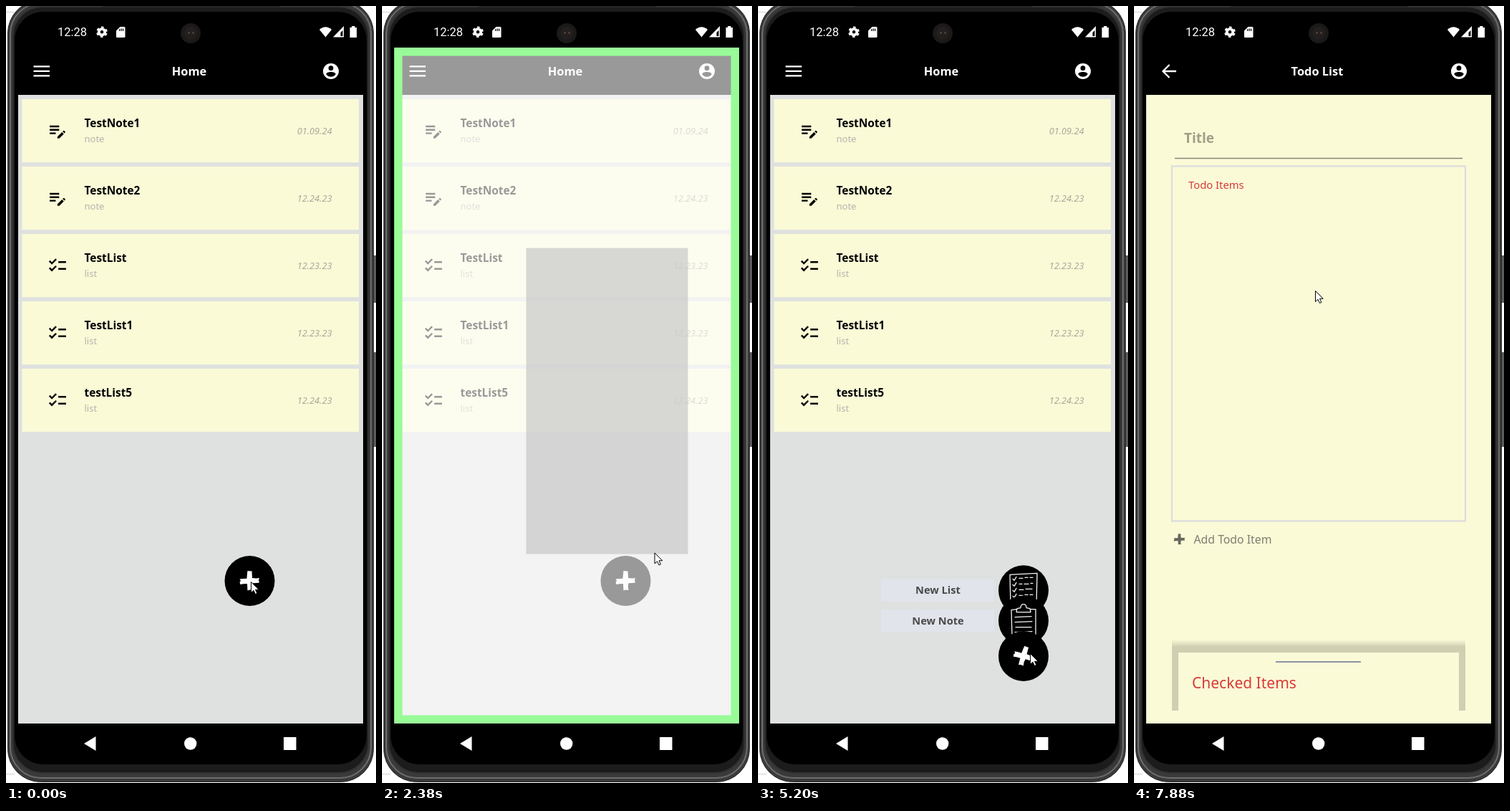
An HTML page that plays this animation: 517x1084 px, repeating every 8000 ms.

```html
<!DOCTYPE html>
<html lang="en">
<head>
<meta charset="utf-8">
<title>Notes app</title>
<style>
html, body { margin: 0; width: 100%; height: 100%; overflow: hidden; background: #fff; }
svg { display: block; width: 517px; height: 1084px; }
text { font-family: "Noto Sans", "Open Sans", sans-serif; }
.name { font-size: 15.4px; font-weight: 600; }
.kind { font-size: 13px; fill: #b4b4ae; }
.date { font-size: 12.8px; font-style: italic; fill: #a9a99c; text-anchor: end; }
.head { font-size: 16.4px; font-weight: 600; fill: #fff; text-anchor: middle; }
.label { font-size: 14.6px; font-weight: 600; fill: #4a4a4a; text-anchor: middle; }
.red { fill: #d93a38; }
.sketch { fill: none; stroke: #f4f4f4; stroke-width: 1.3; stroke-linecap: round; stroke-linejoin: round; }
</style>
</head>
<body>
<svg viewBox="0 0 517 1084">
  <defs>
    <path id="note" d="M3 10h11v2H3zm0-2h11V6H3zm0 8h7v-2H3zm15-3.1.7-.7c.4-.4 1-.4 1.4 0l.7.7c.4.4.4 1 0 1.4l-.7.7zm-.7.7L12 18.9V21h2.1l5.3-5.3z"/>
    <path id="list" d="M22 7h-9v2h9zm0 8h-9v2h9zM5.5 11 2 7.5 3.4 6l2.1 2.2 4.3-4.3 1.4 1.4zm0 8L2 15.5 3.4 14l2.1 2.2 4.3-4.3 1.4 1.4z"/>
    <path id="plus" d="M-3-14 2-13.5 3-14 3.5-4 9-3.6 13.5-4 12.5-1 13.5 2.5 9 3 4 3.2 3.2 8 4 13 0 12.6-3 13.5-3.5 4-9 4.2-13 5-14 2-12.5 0-14-2.5-9-3-4-3.3-3.6-9z"/>
    <linearGradient id="shade" x2="0" y2="1">
      <stop offset="0" stop-color="#cfcfb2" stop-opacity="0"/><stop offset="1" stop-color="#cfcfb2"/>
    </linearGradient>
  </defs>

  <!-- phone -->
  <path d="M0 8.5H12M0 1071.5H12" stroke="#d4d4d4"/>
  <path d="M511 348h6v66h-6zM511 483h6v132h-6z" fill="#5c5c5c"/>
  <rect x="2.5" y="-8" width="511" height="1090.5" rx="46" fill="#3a3a3a" stroke="#262626"/>
  <rect x="6" y="-4" width="504" height="1081" rx="43" fill="none" stroke="#6c6c6c" stroke-width="2"/>
  <rect x="9.5" y="1" width="497" height="1069" rx="41" fill="#1c1c1c" stroke="#333" stroke-width="2"/>
  <path d="M135 0H383" stroke="#222" stroke-width="3"/>
  <rect x="12" y="8" width="492" height="1050" rx="40"/>

  <!-- status bar -->
  <g fill="#fff">
    <text x="72" y="42" style="font:16.5px Roboto,sans-serif">12:28</text>
    <g fill="none" stroke="#fff">
      <circle cx="134" cy="36.3" r="4.2" stroke-width="3.8"/>
      <circle cx="134" cy="36.3" r="6.3" stroke-width="3" stroke-dasharray="3.3" stroke-dashoffset="-1.65"/>
    </g>
    <path d="M159.500 29H165q1.500 0 1.500 1.500v12q0 1.500-1.500 1.500h-9.500q-1.500 0-1.500-1.500V34.500z"/>
    <path d="M158.800 32v3M161.200 31.500v3.500M163.600 31.500v3.500" stroke="#000" stroke-width="1.200"/>
    <path d="M438 33q8.500-7.500 17 0l-8.500 10.500z"/>
    <path d="M457 43.500 472 28v15.500z"/>
    <path d="M467.500 37 470.500 34v8h-3z" fill="#000"/>
    <path d="M480.500 30h2.500v-2h4.500v2h2.500v14h-9.500z"/>
  </g>
  <circle cx="258" cy="38" r="14" fill="#1b1919"/>
  <circle cx="258" cy="38" r="9" fill="#231f1e"/>
  <path d="M254.500 37.500h2M260.500 37.500h2" stroke="#70543f" stroke-width="1.800"/>

  <!-- home screen -->
  <rect x="17" y="124" width="482" height="877" fill="#dfe1e0"/>
  <g id="cards"></g>
  <g id="homeHead">
    <text class="head" x="256" y="97">Home</text>
    <path d="M38.500 84.300H61M38.500 90.800H61M38.500 97.300H61" stroke="#fff" stroke-width="2.300"/>
  </g>

  <g id="menu">
    <g id="listItem">
      <rect x="172" y="-15.500" width="158" height="31" fill="#e2e4ec"/>
      <text class="label" x="251.500" y="5">New List</text>
      <g transform="translate(371 0)">
        <circle r="35"/>
        <path class="sketch" d="M-19-22 19-24 18 21-18 22zM-6-17h5M2-18h4M9-18h4M-6-9h4M1-9h6M10-10h3M-6-1h6M3-2h9M-6 7h5M2 6h4M9 6h4M-15-16l2 2 3-5M-15-8l2 2 3-5M-15 0l2 2 3-5M-15 8l2 2 3-5"/>
      </g>
    </g>
    <g id="noteItem">
      <rect x="172" y="-15.500" width="158" height="31" fill="#e2e4ec"/>
      <text class="label" x="251.500" y="5">New Note</text>
      <g transform="translate(371 0)">
        <circle r="35"/>
        <path class="sketch" d="M-10-16-17-15-16 22 17 21 17-16 10-16M-10-12-9-17-4-18Q-4-23 0-23 4-23 4-18L9-17 10-12zM-12-5 11-6M-12 2 12 1M-11 9 11 9M-12 16 12 15"/>
      </g>
    </g>
  </g>
  <g id="fab"><circle r="35"/><use id="cross" href="#plus" fill="#fff"/></g>

  <!-- list editor -->
  <g id="editor">
    <rect x="17" y="70" width="420" height="54"/>
    <rect x="17" y="124" width="482" height="877" fill="#fafad7"/>
    <text class="head" x="256" y="97">Todo List</text>
    <path d="M59 91H41M49.500 82 40.500 91l9 9" fill="none" stroke="#fff" stroke-width="2.300"/>
    <text x="70" y="191" font-size="19" font-weight="600" fill="#a0a08a">Title</text>
    <path d="M57 212.500H459" stroke="#85857a" stroke-width="1.300"/>
    <rect x="53" y="223.500" width="410" height="495" fill="none" stroke="#dcdcdc" stroke-width="2.200"/>
    <text class="red" x="76" y="255" font-size="14.800">Todo Items</text>
    <use href="#plus" transform="translate(63.500 744) scale(.56)" fill="#66665c"/>
    <text x="83.500" y="750" font-size="15.800" fill="#7e7e72">Add Todo Item</text>
    <rect x="53" y="884" width="410" height="10" fill="url(#shade)"/>
    <path d="M53 893H463V983H454V902H62V983H53z" fill="#cfcfb2"/>
    <path d="M198 915H317" stroke="#8d92a8" stroke-width="2"/>
    <text class="red" x="81" y="952" font-size="21">Checked Items</text>
  </g>

  <g transform="translate(454 91)">
    <circle r="11" fill="#fff"/>
    <circle cy="-4.300" r="3.400"/>
    <path d="M-6.700 4.200C-6.500 0 6.500 0 6.700 4.200 3.500 9-3.500 9-6.700 4.200z"/>
  </g>

  <g id="drag">
    <rect x="17" y="58" width="482" height="943" fill="#fff" fill-opacity=".6"/>
    <rect x="22.700" y="63.800" width="470.600" height="931.400" fill="none" stroke="#98fb98" stroke-width="11.500"/>
    <rect id="box" width="226" height="427" fill="#c8c8c8" fill-opacity=".7"/>
  </g>

  <g fill="#fff">
    <path d="M109 1029 125.500 1019V1039z"/>
    <circle cx="257.700" cy="1029" r="8.700"/>
    <rect x="388" y="1020" width="17.500" height="18"/>
  </g>
  <path id="cursor" fill="#fff" stroke="#000" d="M.5.5V15.500L4 12.300 6.400 17.500 8.900 16.400 6.500 11.300H11.300z"/>
</svg>
<script>
const LOOP = 8000, DRAG = 970, DROP = 3220, OPEN = 5200, CLOSE = 7220;
const LAG = 40; // the dragged box trails the pointer by this many ms
const el = id => document.getElementById(id);
const show = (id, on) => el(id).setAttribute("display", on ? "inline" : "none");
const move = (id, x, y) => el(id).setAttribute("transform", `translate(${x} ${y})`);
const clamp = v => Math.min(1, Math.max(0, v));

// Where the hand turns or rests: [time, x, y]
const stops = [[0, 342, 803], [DRAG, 342, 801], [1600, 338, 616], [2040, 342, 534], [2380, 380.5, 762],
  [2770, 390, 899], [3340, 393, 925], [3730, 387, 908], [4770, 380, 903], [5500, 380, 903],
  [5890, 379, 743], [6160, 377, 704], [6550, 375, 789], [6820, 373, 677], [7610, 373, 677], [7880, 253, 397]];

// Monotone cubic through the stops, so rests stay still and nothing overshoots.
function slope(i, axis) {
  const rate = j => stops[j] && stops[j + 1]
    ? (stops[j + 1][axis] - stops[j][axis]) / (stops[j + 1][0] - stops[j][0]) : 0;
  const a = rate(i - 1), b = rate(i);
  return a * b > 0 ? 2 * a * b / (a + b) : 0;
}

function pointer(t) {
  const last = stops.length - 1;
  if (t >= stops[last][0]) return stops[last].slice(1);
  const i = stops.findIndex(s => s[0] > t) - 1;
  const a = stops[i], b = stops[i + 1], span = b[0] - a[0], u = (t - a[0]) / span, v = 1 - u;
  return [1, 2].map(k => a[k] * v * v * (1 + 2 * u) + b[k] * u * u * (1 + 2 * v)
    + span * u * v * (slope(i, k) * v - slope(i + 1, k) * u));
}

const kinds = ["note", "note", "list", "list", "list"];
const names = ["TestNote1", "TestNote2", "TestList", "TestList1", "testList5"];
const dates = ["01.09.24", "12.24.23", "12.23.23", "12.23.23", "12.24.23"];
el("cards").innerHTML = names.map((name, i) => `
  <g transform="translate(0 ${130 + i * 94})">
    <rect x="22.5" width="470.5" height="88.2" fill="#fafad7"/>
    <use href="#${kinds[i]}" transform="translate(57.5 29.6) scale(1.2)"/>
    <text class="name" x="109.5" y="39.3">${name}</text>
    <text class="kind" x="109.5" y="60.3">${kinds[i]}</text>
    <text class="date" x="455.5" y="48.5">${dates[i]}</text>
  </g>`).join("");

function draw(t) {
  const open = t >= OPEN && t < CLOSE;
  const grow = open ? 1 - Math.exp((OPEN - 29 - t) / 59) : 0;
  const fade = clamp((t - CLOSE - 80) / 300);
  const dragging = t >= DRAG && t < DROP;

  show("drag", dragging);
  if (dragging) {
    const [x, y] = pointer(t - LAG);
    move("box", x - 176.5, y - 402);
  }
  show("menu", open);
  move("listItem", 0, 907 - 230 * grow);
  move("noteItem", 0, 907 - 124 * grow);
  show("fab", t < CLOSE);
  move("fab", ...(t < DROP ? [340.5, 802] : [371, 907]));
  el("cross").setAttribute("transform", `rotate(${45 * grow})`);
  show("editor", fade > 0);
  el("editor").setAttribute("opacity", fade);
  el("homeHead").setAttribute("opacity", 1 - fade);
  move("cursor", ...pointer(t));
}

const begin = performance.now();
function frame() {
  draw((performance.now() - begin) % LOOP);
  requestAnimationFrame(frame);
}
frame();
</script>
</body>
</html>
```
